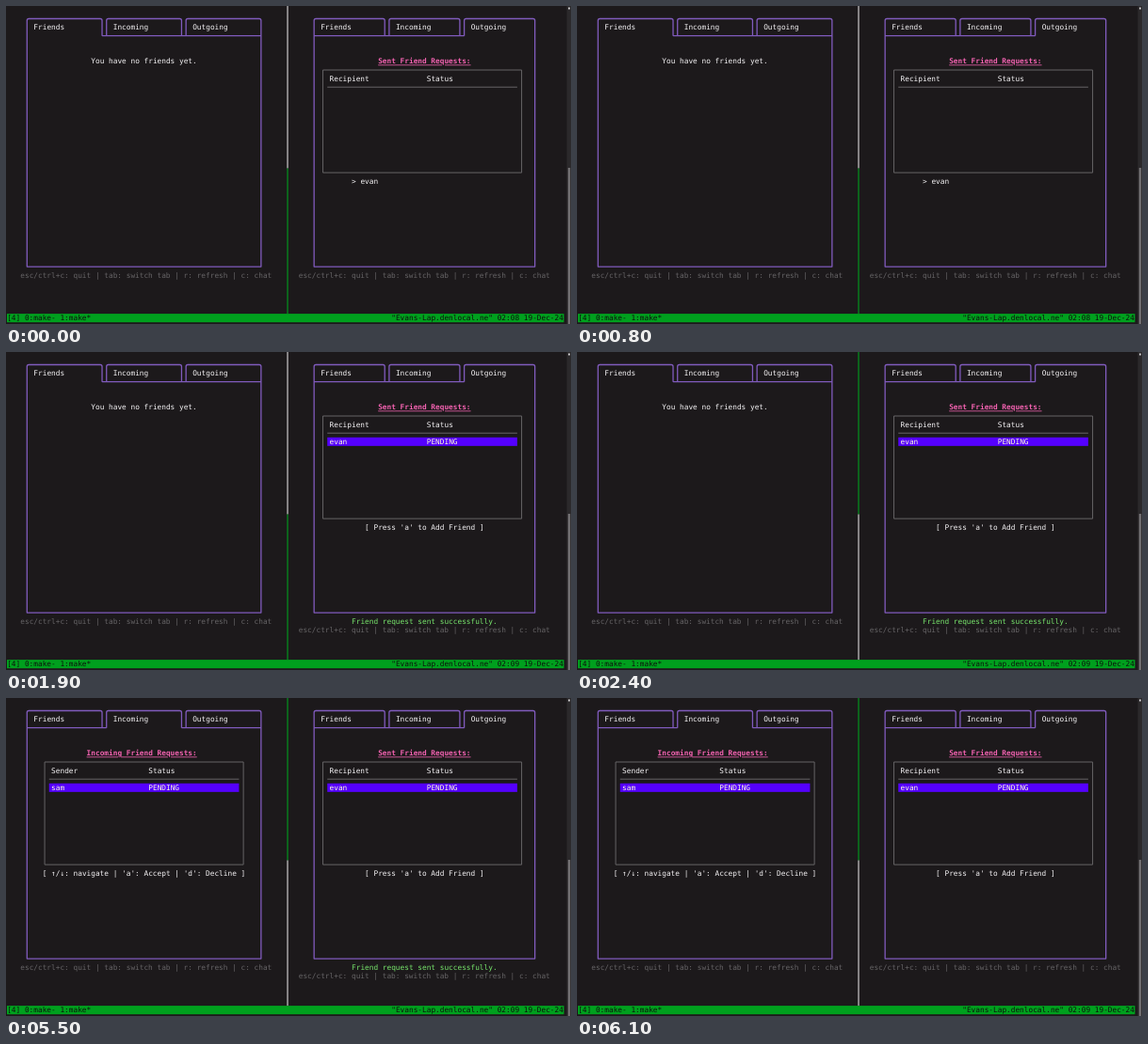
An HTML page that plays this animation: 600 px wide and 338 px high, repeating every 8 s.

```html
<!DOCTYPE html>
<html lang="en">
<head>
<meta charset="utf-8">
<style>
  html, body { margin: 0; width: 100%; height: 100%; overflow: hidden; background: #1c191b; }
  svg { display: block; }
  text {
    font: 7.79px "DejaVu Sans Mono", monospace;
    white-space: pre;
    text-rendering: geometricPrecision;
  }
  .title { font-weight: bold; text-decoration: underline; }
</style>
</head>
<body>
<svg id="stage" width="600" height="338" viewBox="0 0 600 338"></svg>
<script>
const LOOP = 8000;
const CELL = 4.69, ROW = 9.09;
const PURPLE = '#805bbd', GREY = '#666466', WHITE = '#f6f4f6', GREEN = '#00a01e', PINK = '#f262b0';
const stage = document.getElementById('stage');

// Terminal grid: left edge of a column, its middle, and the middle of a row.
const left = col => 1.2 + col * CELL;
const midX = col => left(col + 0.5);
const midY = row => 4.4 + row * ROW;

const text = (col, row, str, fill = WHITE, cls = '') =>
  `<text x="${left(col)}" y="${midY(row) + 2.5}" fill="${fill}" class="${cls}">${str}</text>`;
const rect = (x, y, w, h, fill) =>
  `<rect x="${x}" y="${y}" width="${w}" height="${h}" fill="${fill}"/>`;
const line = (d, stroke, width = 1.1) =>
  `<path d="${d}" fill="none" stroke="${stroke}" stroke-width="${width}" stroke-linejoin="round"/>`;

function tabWindow(col, tabWidth, active) {
  const top = midY(1), base = midY(3), bottom = midY(30);
  const start = midX(col), end = midX(col + 3 * tabWidth - 1);
  const gapStart = midX(col + active * tabWidth), gapEnd = midX(col + (active + 1) * tabWidth - 1);
  let d = `M${start} ${base}V${bottom}H${end}V${base}M${start} ${base}H${gapStart}M${gapEnd} ${base}H${end}`;
  let labels = '';
  ['Friends', 'Incoming', 'Outgoing'].forEach((name, i) => {
    const first = col + i * tabWidth;
    d += `M${midX(first)} ${base}V${top + 2}q0-2 2-2H${midX(first + tabWidth - 1) - 2}q2 0 2 2V${base}`;
    labels += text(first + 2, 2, name);
  });
  return line(d, PURPLE, 1.3) + labels;
}

function table(col, heading, name) {
  const x = midX(col), end = midX(col + 45);
  const inner = midX(col + 1), innerEnd = midX(col + 44);
  const frame = `M${x} ${midY(7)}H${end}V${midY(19)}H${x}Z M${inner} ${midY(9)}H${innerEnd}`;
  let out = line(frame, GREY, 1) + text(col + 2, 8, heading) + text(col + 24, 8, 'Status');
  if (name) {
    out += rect(inner, midY(9.5), innerEnd - inner, ROW, '#5500ff')
      + text(col + 2, 10, name, '#ffffd8') + text(col + 24, 10, 'PENDING', '#ffffd8');
  }
  return out;
}

const help = (col, row) =>
  text(col, row, 'esc/ctrl+c: quit | tab: switch tab | r: refresh | c: chat', GREY);

function leftPane(t) {
  const incoming = t >= 4100;
  let out = tabWindow(4, 18, incoming ? 1 : 0) + help(3, 31);
  if (!incoming) return out + text(19, 6, 'You have no friends yet.');
  return out + text(18, 6, 'Incoming Friend Requests:', PINK, 'title')
    + table(8, 'Sender', t >= 5500 && 'sam')
    + text(8, 20, "[ ↑/↓: navigate | 'a': Accept | 'd': Decline ]");
}

function rightPane(t) {
  const sent = t >= 1100, notice = sent && t < 6100;
  let out = tabWindow(69, 17, 2)
    + text(84, 6, 'Sent Friend Requests:', PINK, 'title')
    + table(71, 'Recipient', sent && 'evan')
    + help(66, notice ? 32 : 31);
  if (notice) out += text(78, 31, 'Friend request sent successfully.', '#78e66c');
  out += sent ? text(81, 20, "[ Press 'a' to Add Friend ]") : text(78, 20, '&gt; evan');
  if (t >= 300 && t < 800) out += rect(left(84), midY(19.5), CELL, ROW, WHITE);
  return out;
}

function chrome(t) {
  const leftFocused = t >= 2300, split = midY(18.5), barTop = midY(35.5);
  const clock = t >= 1900 ? '02:09' : '02:08';
  return line(`M${midX(63)} 0V${split}`, leftFocused ? GREEN : '#dedcde')
    + line(`M${midX(63)} ${split}V${barTop}`, leftFocused ? '#dedcde' : GREEN)
    + rect(1, barTop, 591.5, ROW, GREEN)
    + text(0, 36, '[4] 0:make- 1:make*', '#0c120c')
    + text(87, 36, `"Evans-Lap.denlocal.ne" ${clock} 19-Dec-24`, '#0c120c')
    + rect(595.5, 0, 4.5, 338, '#2b292b')
    + rect(596.8, 172, 2.4, 166, '#737173')
    + rect(597, 1.5, 2, 2, '#c4c2c4');
}

let shown = '';
function draw(now) {
  const t = now % LOOP;
  const picture = leftPane(t) + rightPane(t) + chrome(t);
  if (picture !== shown) stage.innerHTML = shown = picture;
  requestAnimationFrame(draw);
}
draw(performance.now());
</script>
</body>
</html>
```
